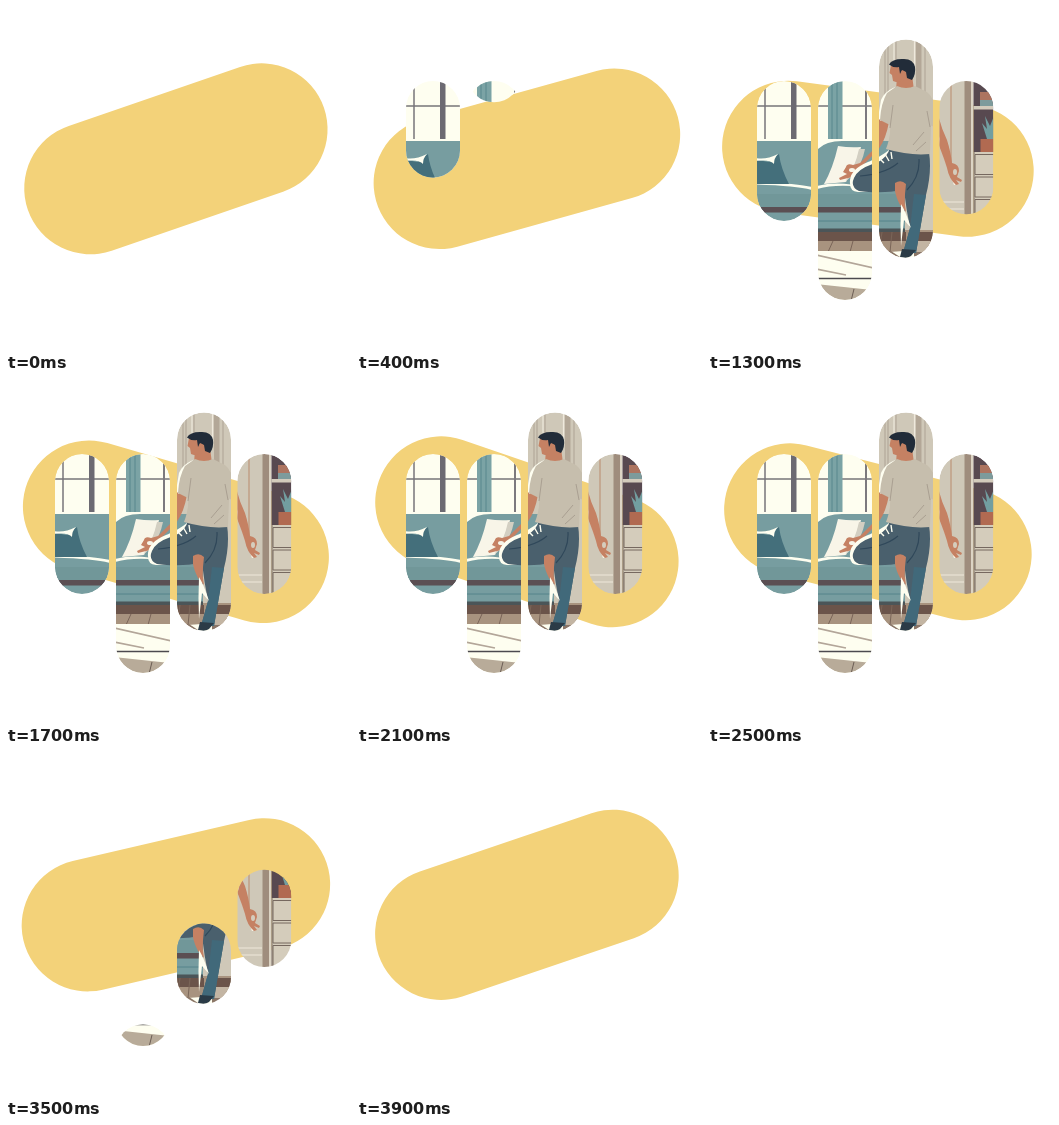
An HTML page for the animation above (4000 ms loop, 345 by 345 pixels).

```html
<!DOCTYPE html>
<html lang="en">
<head>
<meta charset="utf-8">
<title>Yoga at home</title>
<style>
html, body { margin: 0; width: 100%; height: 100%; overflow: hidden; background: #fff; }
svg { display: block; width: 100vw; height: 100vh; }
</style>
</head>
<body>
<svg viewBox="0 0 345 345">
  <defs id="defs">
    <g id="scene">
      <!-- window -->
      <path fill="#fefef0" d="M45 30H171V300H45Z"/>
      <path stroke="#77757a" stroke-width="1.500" fill="none" d="M57 70V133M49 100H104M110 100H165"/>
      <path fill="#6c6a72" d="M83 70h5.500v63h-5.500Z"/>
      <path fill="#7c7a7e" d="M157 70h2v63h-2Z"/>
      <path fill="#7ba3a5" d="M120 70h14.500v63h-14.500Z"/>
      <path stroke="#5f8c92" stroke-width="1.200" d="M124 70V133M129 70V133"/>
      <!-- wall -->
      <path fill="#cfc8b8" d="M168 30H257V240H168Z"/>
      <path fill="#b3a797" d="M208 30h5.500v58h-5.500Z"/>
      <path stroke="#efe9dc" stroke-width="1.200" fill="none" d="M186 30V60M206.500 30V60M231 196H256M231 203H256"/>
      <path stroke="#ada294" fill="none" d="M177 30V90M180 30V90M188 30V56M217 30V90"/>
      <path stroke="#b98a6c" fill="none" d="M243 70V158"/>
      <!-- floor and rug -->
      <path fill="#a8937f" d="M105 224H230V246H105Z"/>
      <path fill="#6b544a" d="M105 226H198V235H105ZM206 226H230V235H206Z"/>
      <path fill="#c3b5a3" d="M206 235H230V246H206Z"/>
      <path stroke="#7a6558" fill="none" d="M125 235L120 246M145 235L142 246M174 226L171 246M184 226L182 246"/>
      <path fill="#fefef0" d="M105 245H168V300H105ZM182 246L208 244V256H190Z"/>
      <path fill="#8b7667" d="M168 245H183L192 251V256H168ZM206 246H230V256H206Z"/>
      <path stroke="#b3a699" stroke-width="1.700" fill="none" d="M108 249L166 262M108 263L138 269"/>
      <path fill="#b8ab99" d="M108 278L164 284L161 298H108Z"/>
      <path stroke="#4c4a4f" stroke-width="1.500" fill="none" d="M108 272.500H166"/>
      <path stroke="#6b5d54" fill="none" d="M146 283L143 295"/>
      <!-- sofa -->
      <path fill="#779da0" d="M45 135H105V224H45ZM109 144Q117 135 134 135H197V226H109Z"/>
      <path fill="#719799" d="M45 188H197V201H45Z"/>
      <path fill="#5b4f53" d="M45 201H197V206.500H45Z"/>
      <path fill="#4b5558" d="M105 222.500H197V226H105Z"/>
      <path stroke="#55838a" fill="none" d="M105 215H197"/>
      <path fill="#fefef0" d="M49 177.500Q82 176.500 104 181V184Q90 180 49 178.500ZM109 180Q124 176 143 178.500V180Q122 179 109 183Z"/>
      <path fill="#446f7b" d="M45 153L60 156L71 148Q73 163 81 178H45Z"/>
      <path fill="#fefef0" d="M48 152Q58 154 70 148Q66 152 66 158Q62 153 48 155Z"/>
      <path fill="#f8f5e8" d="M130 140Q142 142 153 141Q150 158 138 176L116 178Q125 162 130 140Z"/>
      <path fill="#d3cfc2" d="M151 143L157 143Q154 158 146 168L137 176Q147 162 151 143Z"/>
      <!-- cabinet -->
      <path fill="#9f8d7d" d="M256.500 70h6.500v150h-6.500Z"/>
      <path fill="#dcd4c4" d="M263 70h2.500v150h-2.500Z"/>
      <path fill="#584950" d="M265.500 74h22v72h-22Z"/>
      <path fill="#d3cbbc" d="M265.500 100h22v3.500h-22Z"/>
      <path fill="#ad7460" d="M272 86h14v8h-14Z"/>
      <path fill="#7d9b9c" d="M272 94h14v6h-14Z"/>
      <path fill="#b16a51" d="M272.500 133h14v13h-14Z"/>
      <path fill="#729ea0" d="M279 133L274 117L279 123L277 110L282 120L286 110V133Z"/>
      <path fill="#d4ccbb" d="M265.500 146h22v74h-22Z"/>
      <path stroke="#76685f" fill="none" d="M266 146V218M288 148.500H267V168.500H288M288 171H267V191H288M288 193.500H267V218"/>
      <!-- arms -->
      <path fill="#fefef0" d="M230 128Q233 145 238 157L246 179L249 178L241 154Z"/>
      <path fill="#c58163" d="M223 108H230Q233 122 239 134Q243 147 244 157Q251 158 251 165L249 171L254 174L253 176L248 174L251 178L248 179Q241 173 239 162Q235 149 226 127Z"/>
      <ellipse cx="247" cy="166" rx="2" ry="3" fill="#d5cdbd"/>
      <path fill="#c58163" d="M171 110L181 116Q177 138 167 147L155 159Q150 168 144 171L132 174L131 172L139 168L135 166L138 161Q139 157 145 159L152 157L164 145Q170 134 171 110Z"/>
      <ellipse cx="144" cy="164" rx="3" ry="2" fill="#f8f5e8"/>
      <!-- legs -->
      <path fill="#fefef0" d="M181 144Q174 150 160 156Q143 163 142 174Q141 186 150 186L190 185V170Z"/>
      <path fill="#4a606d" d="M182 142L221 146Q224 166 218 189L208 247H195L202 222Q198 202 196 184Q172 188 151 185Q142 181 146 172Q150 162 168 157Q179 152 182 142Z"/>
      <path fill="#41697a" d="M206 188L218 189L208 247H195L202 222Z"/>
      <path fill="#c58163" d="M187 177Q193 173 198 178L197 188Q196 197 198 206L192 199Q188 191 187 185Z"/>
      <path fill="#fefef0" d="M193 198Q198 206 203 222L196 214L193 240Q192 218 193 198Z"/>
      <path stroke="#30485a" stroke-width="1.200" fill="none" d="M190 157Q177 168 152 170M211 153Q212 171 199 184"/>
      <path stroke="#fefef0" stroke-width="1.400" fill="none" d="M171 152L176 157M177 148L181 155M183 146L184 153"/>
      <path fill="#2b3b47" d="M194 243L208 244L203 250Q199 253 192 251Z"/>
      <!-- torso and head -->
      <path fill="#c58163" d="M189 69L204 69L206 84L188 85Z"/>
      <path fill="#fefef0" d="M187 81Q176 86 173 94L170 112L173 115L182 95Z"/>
      <path fill="#c6bead" d="M189 80Q198 84 207 80L219 86Q226 91 229 108L231 116L223 120L222 148Q202 150 178 143Q183 130 182 119L172 114Q173 97 179 87Z"/>
      <path stroke="#a99f91" fill="none" d="M185 99L182 122M219 105L222 121M216 126L205 139M218 136L208 145"/>
      <path fill="#c58163" d="M183 59L202 59L203 70Q197 76 188 76L185 75L184 69L181.500 67Z"/>
      <path fill="#222c39" d="M181 58.500Q184 53 194 53Q205 52 207 61Q208 68 204 74L199 72L198 66L194 64L192 68L191 61Q185 62 181 58.500Z"/>
      <ellipse cx="195" cy="68" rx="2" ry="3.200" fill="#c58163"/>
    </g>
  </defs>
  <line id="band" stroke="#f3d279" stroke-width="132" stroke-linecap="round"/>
  <g id="pills"></g>
</svg>
<script>
const LOOP = 4000, PEAK = 2060, SLIDE = 600;
const CX = 169.9, CY = 152.8, REACH = 90.6;
const pills = [
  { x: 49, y: 75, h: 140 },
  { x: 110, y: 75, h: 219 },
  { x: 171, y: 33.5, h: 218.5 },
  { x: 231.3, y: 75, h: 140 }
];
const byId = id => document.getElementById(id);
const ease = p => (1 - Math.cos(Math.PI * Math.min(1, Math.max(0, p)))) / 2;

function make(name, attrs, parent) {
  const el = document.createElementNS("http://www.w3.org/2000/svg", name);
  for (const key in attrs) el.setAttribute(key, attrs[key]);
  return parent.appendChild(el);
}

function addClip(id, pill) {
  const clip = make("clipPath", { id }, byId("defs"));
  return make("rect", { x: pill.x, y: pill.y, width: 54, height: pill.h, rx: 27 }, clip);
}

// Each pill is the overlap of a resting shape and a sliding one.
pills.forEach((pill, i) => {
  addClip("rest" + i, pill);
  pill.mask = addClip("slide" + i, pill);
  const outer = make("g", { "clip-path": `url(#rest${i})` }, byId("pills"));
  const inner = make("g", { "clip-path": `url(#slide${i})` }, outer);
  make("use", { href: "#scene" }, inner);
});

function draw(t) {
  const swing = t < PEAK ? ease(t / PEAK) : 1 - ease((t - PEAK) / (LOOP - PEAK));
  const angle = (swing * 38 - 19) * Math.PI / 180;
  const dx = REACH * Math.cos(angle), dy = REACH * Math.sin(angle);
  const ends = { x1: CX - dx, y1: CY - dy, x2: CX + dx, y2: CY + dy };
  for (const key in ends) byId("band").setAttribute(key, ends[key]);

  pills.forEach((pill, i) => {
    const enter = ease((t - 27 - 253 * i) / SLIDE);
    const leave = ease((t - 2896 - 127 * i) / SLIDE);
    pill.mask.setAttribute("y", pill.y + pill.h * (enter - 1 + leave));
  });
}

const start = performance.now();
function tick() {
  draw((performance.now() - start) % LOOP);
  requestAnimationFrame(tick);
}
draw(0);
requestAnimationFrame(tick);
</script>
</body>
</html>
```
